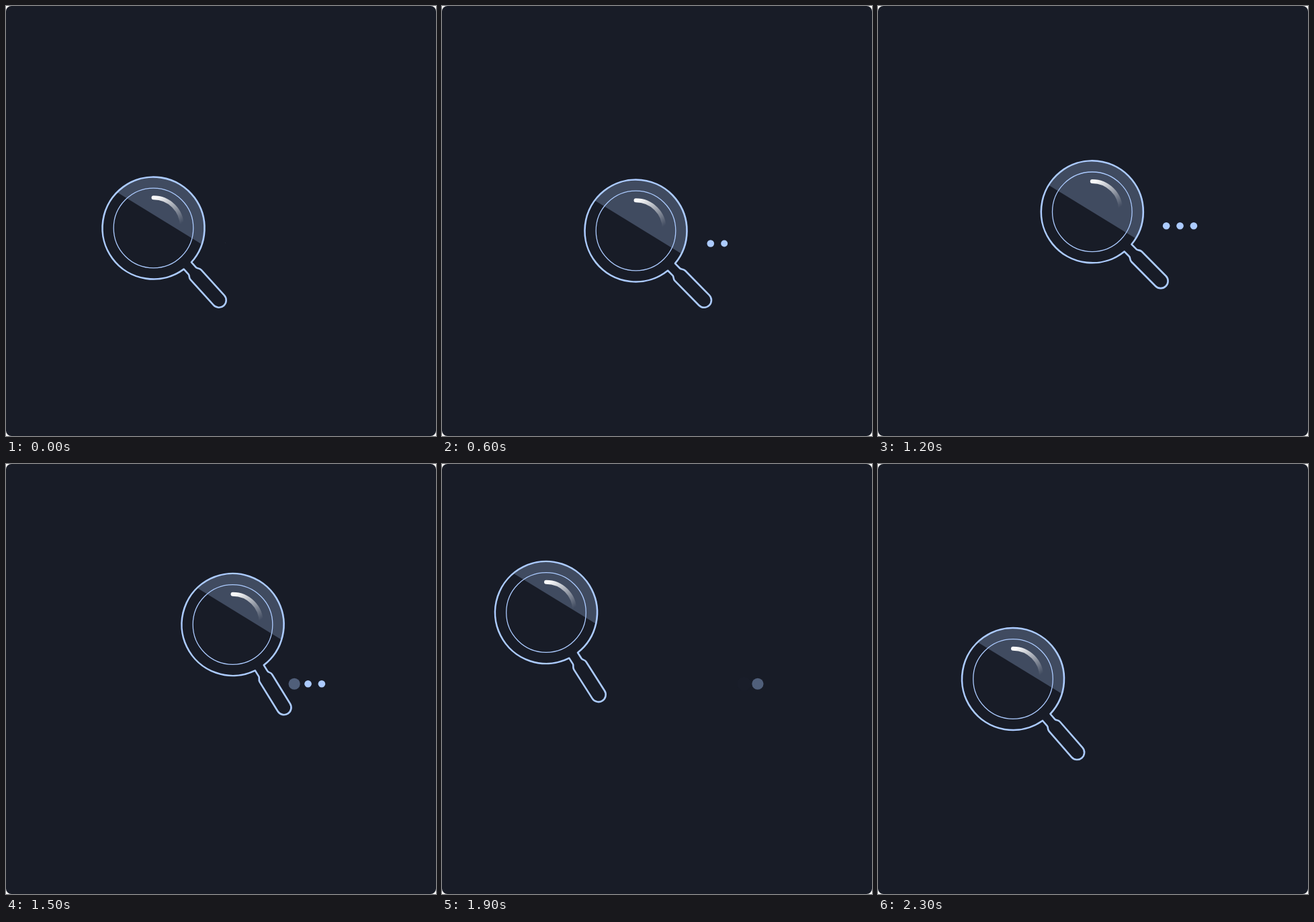
These frames come from a looping animation (640x640 px, 2.4 s). An HTML page with a canvas:

```html
<!DOCTYPE html>
<html lang="en">
<head>
<meta charset="utf-8">
<title>Searching</title>
<style>
  html, body { margin: 0; width: 100%; height: 100%; overflow: hidden; background: #fff; }
  canvas { display: block; width: 640px; height: 640px; }
</style>
</head>
<body>
<canvas id="stage" width="640" height="640"></canvas>
<script>
const ctx = document.getElementById('stage').getContext('2d');
const LOOP = 2400, STEP = 100;
const BG = '#181c27', LINE = '#accbff', SHADE = '#404b60';
const RING = 76, INNER = 59.3, NECK = 7.6, GRIP = 10.8, TIP = 145;
const DOT = 5.3, GAP = 20.4, PARK = 1200;

// time, lens x, lens y, handle angle, height of the shade edge
const KEYS = [
  [0, 219.5, 330.5, 47.8, -20],
  [300, 257, 339, 46.4, -14],
  [600, 288.5, 334.5, 45.5, -7.5],
  [800, 302, 325.5, 45.1, -3.7],
  [1200, 318.8, 306.3, 45.3, 0],
  [1300, 322, 302, 46.5, -2.5],
  [1400, 332, 281, 51, -11],
  [1500, 337.5, 239, 58.3, -22],
  [1600, 318, 185, 62, -27],
  [1700, 242, 163.5, 62.5, -29],
  [1800, 170.5, 186.5, 60.5, -29.5],
  [1900, 155, 221, 57.5, -28.5],
  [2100, 168, 281, 52.7, -26],
  [2300, 201, 320, 48.9, -22.5]
];

// Key by index, wrapping around the loop
function key(i) {
  const n = KEYS.length, turn = Math.floor(i / n);
  const k = KEYS[i - turn * n].slice();
  k[0] += turn * LOOP;
  return k;
}

// Smooth closed curve through the keys
function pose(t) {
  let i = KEYS.length - 1;
  while (KEYS[i][0] > t) i--;
  const [a, b, c, d] = [key(i - 1), key(i), key(i + 1), key(i + 2)];
  const span = c[0] - b[0], u = (t - b[0]) / span, u2 = u * u, u3 = u2 * u;
  const at = j => {
    const m0 = (c[j] - a[j]) / (c[0] - a[0]) * span;
    const m1 = (d[j] - b[j]) / (d[0] - b[0]) * span;
    return (2 * u3 - 3 * u2 + 1) * b[j] + (u3 - 2 * u2 + u) * m0
      + (3 * u2 - 2 * u3) * c[j] + (u3 - u2) * m1;
  };
  return { x: at(1), y: at(2), angle: at(3) * Math.PI / 180, shade: at(4) };
}

// cubic-bezier(.25, .1, .25, 1)
function ease(x) {
  if (x <= 0) return 0;
  if (x >= 1) return 1;
  const curve = (s, p, q) => 3 * s * (1 - s) * (1 - s) * p + 3 * s * s * (1 - s) * q + s * s * s;
  let lo = 0, hi = 1;
  for (let i = 0; i < 24; i++) {
    const mid = (lo + hi) / 2;
    if (curve(mid, .25, .25) < x) lo = mid; else hi = mid;
  }
  return curve(lo, .1, 1);
}

function circle(x, y, r) {
  ctx.beginPath();
  ctx.arc(x, y, r, 0, 2 * Math.PI);
}

function drawShade(edge) {
  ctx.save();
  circle(0, 0, RING);
  ctx.clip();
  const rise = 90 * 0.613;
  ctx.beginPath();
  ctx.moveTo(-90, edge - rise);
  ctx.lineTo(90, edge + rise);
  ctx.lineTo(90, -90);
  ctx.lineTo(-90, -90);
  ctx.fillStyle = SHADE;
  ctx.fill();
  ctx.restore();
}

function drawOutline(angle) {
  const half = Math.asin(NECK / RING);
  ctx.save();
  ctx.rotate(angle);
  ctx.beginPath();
  ctx.arc(0, 0, RING, half, 2 * Math.PI - half);
  ctx.lineTo(86, -NECK);
  ctx.bezierCurveTo(89, -NECK, 89.5, -GRIP, 94, -GRIP);
  ctx.lineTo(TIP, -GRIP);
  ctx.arc(TIP, 0, GRIP, -Math.PI / 2, Math.PI / 2);
  ctx.lineTo(94, GRIP);
  ctx.bezierCurveTo(89.5, GRIP, 89, NECK, 86, NECK);
  ctx.closePath();
  ctx.lineWidth = 2.6;
  ctx.stroke();
  ctx.restore();
}

function drawGloss() {
  const g = ctx.createLinearGradient(6, -46, 38, -4);
  g.addColorStop(0, 'rgba(255,255,255,.97)');
  g.addColorStop(1, 'rgba(255,255,255,0)');
  ctx.beginPath();
  ctx.arc(0, -3, 42.3, -Math.PI / 2, 0);
  ctx.strokeStyle = g;
  ctx.lineWidth = 6;
  ctx.lineCap = 'round';
  ctx.stroke();
}

function drawLens(p) {
  ctx.save();
  ctx.translate(p.x, p.y);
  drawShade(p.shade);
  ctx.strokeStyle = LINE;
  ctx.lineJoin = 'round';
  circle(0, 0, INNER);
  ctx.lineWidth = 1.3;
  ctx.stroke();
  drawOutline(p.angle);
  drawGloss();
  ctx.restore();
}

// Dots pop in one by one beside the lens, stay behind, then burst in turn
function drawDots(t) {
  const held = Math.min(t, PARK), p = pose(held);
  const x = p.x + 107.2 + 4.4 * Math.sin(Math.PI * held / 1600);
  const y = p.y + 22 - 3 * Math.sin(Math.PI * held / 1350);
  ctx.fillStyle = LINE;
  for (let i = 0; i < 3; i++) {
    const grow = ease((t + 12 - i * 400) / 300);
    const burst = ease((t - 1357 - i * 200) / 400);
    if (!grow || burst === 1) continue;
    ctx.globalAlpha = 1 - burst;
    circle(x + i * GAP, y, DOT * grow * (1 + burst));
    ctx.fill();
  }
  ctx.globalAlpha = 1;
}

function draw(t) {
  ctx.clearRect(0, 0, 640, 640);
  ctx.beginPath();
  ctx.roundRect(0, 0, 640, 640, 8);
  ctx.fillStyle = BG;
  ctx.fill();
  drawDots(t);
  drawLens(pose(t));
}

const start = performance.now();
function tick() {
  const t = Math.max(0, performance.now() - start) % LOOP;
  draw(Math.floor(t / STEP) * STEP);
  requestAnimationFrame(tick);
}
tick();
</script>
</body>
</html>
```
